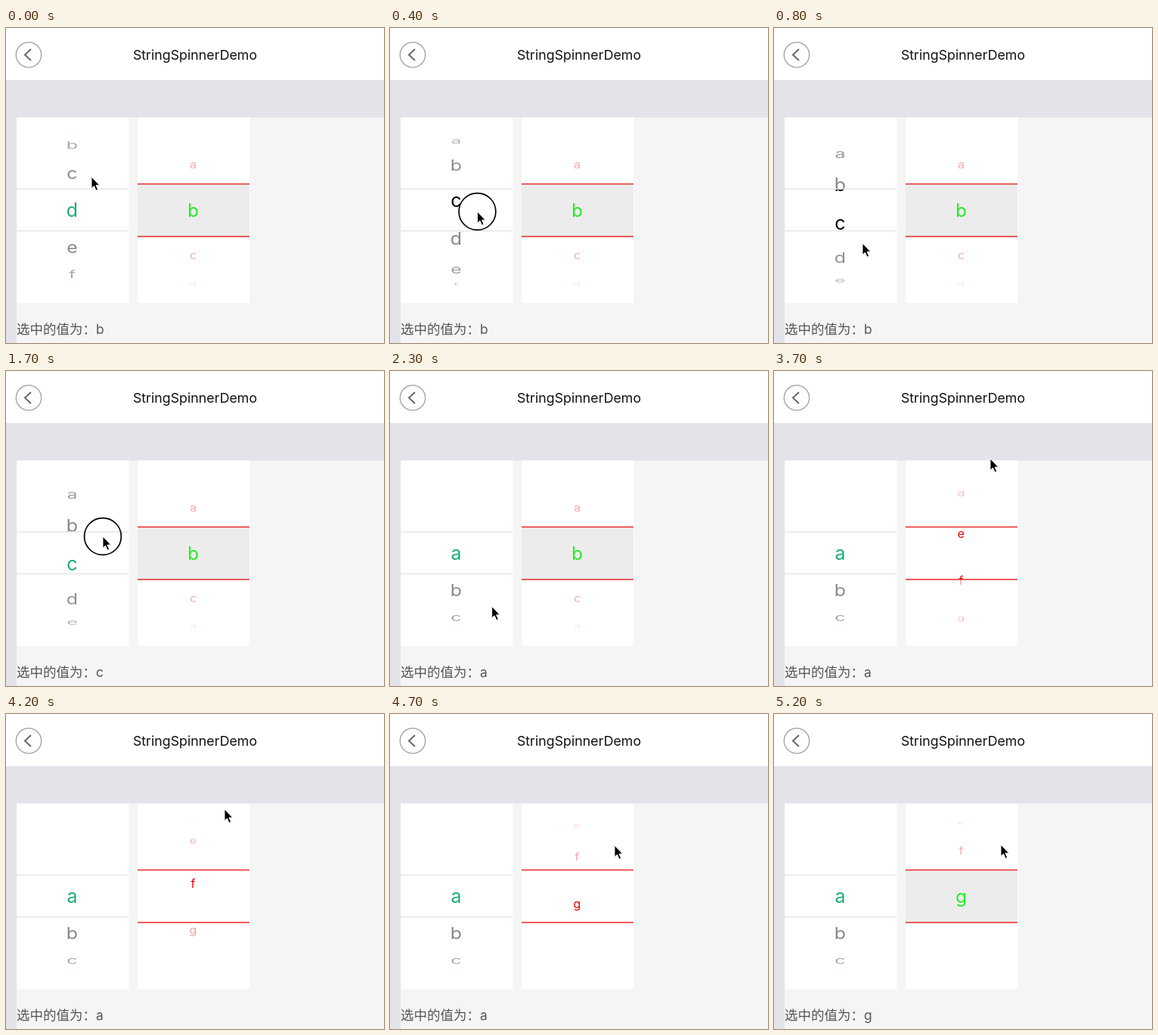
Animation of 500 by 417 pixels, one loop 5.6 s. Source, as an HTML page:

```html
<!DOCTYPE html>
<html lang="zh">
<head>
<meta charset="utf-8">
<title>StringSpinnerDemo</title>
<style>
html, body { margin: 0; width: 100%; height: 100%; overflow: hidden; background: #fff; }
svg { display: block; width: 500px; height: 417px; font-family: Inter, "Noto Sans CJK SC", "Noto Sans CJK", sans-serif; }
</style>
</head>
<body>
<svg id="stage" viewBox="0 0 500 417" xmlns="http://www.w3.org/2000/svg">
  <rect width="500" height="417" fill="#e4e3ea"/>
  <rect width="500" height="69" fill="#fff"/>
  <circle cx="30" cy="35.5" r="16.7" fill="none" stroke="#a0a0a0" stroke-width="1.3"/>
  <path d="M33 28 L25 35.5 L33 43" fill="none" stroke="#666" stroke-width="2"/>
  <text x="250" y="42" font-size="17.8" text-anchor="middle" fill="#111">StringSpinnerDemo</text>
  <rect x="14" y="118.5" width="486" height="298.5" fill="#f5f5f5"/>
  <rect x="14.5" y="118.5" width="148" height="245.5" fill="#fff"/>
  <rect x="174.5" y="118.5" width="148" height="245.5" fill="#fff"/>
  <g id="wheels"></g>
  <text x="14" y="405.3" font-size="17.5" fill="#555">选中的值为：</text>
  <text id="value" x="119" y="405.3" font-size="17.5" fill="#555"></text>
  <circle id="ring" r="24.4" fill="none" stroke="#000" stroke-width="1.7"/>
  <path id="arrow" d="M0 0 V15.4 L3.5 12.2 L6.1 18.2 L8.7 17.1 L6.1 11.2 H10.8 Z" fill="#000" stroke="#fff" stroke-width="1"/>
</svg>
<script>
const LOOP = 5600, MID = 241, LETTERS = [..."abcdefg"];
const $ = id => document.getElementById(id);

function add(parent, tag, attrs, text) {
  const node = document.createElementNS("http://www.w3.org/2000/svg", tag);
  set(node, attrs);
  if (text) node.textContent = text;
  parent.appendChild(node);
  return node;
}
function set(node, attrs) {
  for (const k in attrs) node.setAttribute(k, attrs[k]);
}

const lin = u => u;
const smooth = u => u * u * (3 - 2 * u);
const out = u => 1 - Math.pow(1 - u, 1.6);

// Each key is [time, [values], easing towards this key].
function track(keys, t) {
  let i = keys.findIndex(k => k[0] > t);
  if (i < 0) return keys[keys.length - 1][1];
  if (i === 0) return keys[0][1];
  const [t0, a] = keys[i - 1], [t1, b, ease = lin] = keys[i];
  const u = ease((t - t0) / (t1 - t0));
  return a.map((v, j) => v + (b[j] - v) * u);
}

const spinners = [
  {
    x: 87.5, left: 14.5, top: 213, bottom: 268.5, radius: 99.5, step: 29.5,
    size: 25, bigSize: 25, color: "#000", picked: "#1aad7d", fade: c => 0.5 * Math.pow(c, 0.6),
    line: "#e6e6e6", lineWidth: 1.5, back: "none",
    keys: [[200, [3]], [600, [1.5], smooth], [700, [1.5]], [800, [1.66]], [1100, [2], out],
           [1600, [2]], [1700, [1.73]], [2200, [0], out]],
    sel: t => t < 1100 ? 3 : t < 2300 ? 2 : 0
  },
  {
    x: 247.5, left: 174, top: 206.5, bottom: 276, radius: 102, step: 36,
    size: 16, bigSize: 24, color: "#e60000", picked: "#22ec22", fade: c => 0.42 * c,
    line: "#e82a2a", lineWidth: 1.5, back: "#ececec",
    keys: [[3100, [1]], [3500, [3.3], smooth], [3700, [4.41]], [5000, [6], out]],
    sel: t => t < 5000 ? 1 : 6
  }
];

const pointer = [
  [0, [113, 197]], [200, [114, 205]], [600, [117, 281], smooth], [800, [117, 285]],
  [1500, [127, 205], smooth], [1600, [127, 205]], [1700, [128, 219]], [2200, [133, 310], out],
  [2500, [138, 315]], [3000, [252, 268], smooth], [3100, [259, 265]],
  [3600, [284, 119], smooth], [3700, [286, 116]], [4200, [289, 126]],
  [4700, [297, 174], smooth], [4800, [300, 173]]
];
const presses = [[200, 600], [1600, 2100], [3100, 3500]];

spinners.forEach((s, n) => {
  const root = $("wheels"), h = s.bottom - s.top;
  const clip = add(root, "clipPath", { id: "band" + n });
  add(clip, "rect", { x: s.left, y: s.top, width: 148, height: h });
  const rest = add(root, "clipPath", { id: "rest" + n });
  add(rest, "rect", { x: s.left, y: 118, width: 148, height: s.top - 118 });
  add(rest, "rect", { x: s.left, y: s.bottom, width: 148, height: 364 - s.bottom });
  const outer = add(root, "g", { "clip-path": `url(#rest${n})` });
  const inner = add(root, "g", { "clip-path": `url(#band${n})` });
  s.back = add(inner, "rect", { x: s.left, width: 148, height: h, fill: s.back });
  const row = (g, l) => add(g, "text", { "text-anchor": "middle", fill: s.color, "font-size": s.size }, l);
  s.rows = LETTERS.map(l => [row(outer, l), row(inner, l)]);
  for (const y of [s.top, s.bottom])
    add(root, "rect", { x: s.left, y: y - s.lineWidth / 2, width: 148, height: s.lineWidth, fill: s.line });
});

function drawSpinner(s, t) {
  const [pos] = track(s.keys, t), sel = s.sel(t);
  s.rows.forEach(([far, near], i) => {
    const angle = (i - pos) * s.step * Math.PI / 180;
    const c = Math.cos(angle), shown = Math.abs(angle) < Math.PI / 2;
    const y = MID + s.radius * Math.sin(shown ? angle : Math.sign(angle) * Math.PI / 2);
    const place = `translate(${s.x} ${y}) scale(1 ${Math.max(c, 0.01)})`;
    const size = i === sel ? s.bigSize : s.size;
    set(far, { transform: place, y: s.size * 0.364, opacity: shown ? s.fade(c) : 0 });
    set(near, {
      transform: place, y: size * 0.364, "font-size": size, opacity: shown ? 1 : 0,
      fill: i === sel ? s.picked : s.color
    });
    if (i === sel) {
      const h = s.bottom - s.top;
      set(s.back, { y: y - h / 2, opacity: shown ? 1 : 0 });
    }
  });
}

function draw(time) {
  const t = Math.floor((time % LOOP) / 100) * 100;
  spinners.forEach(s => drawSpinner(s, t));
  $("value").textContent = t < 1100 ? "b" : t < 2300 ? "c" : t < 5000 ? "a" : "g";
  const at = `translate(${track(pointer, t).join(" ")})`;
  set($("arrow"), { transform: at });
  const down = presses.some(([a, b]) => t >= a && t <= b);
  set($("ring"), { transform: at, opacity: down ? 1 : 0 });
}

let start = null;
function tick(now) {
  if (start === null) start = now;
  draw(Math.max(0, now - start));
  requestAnimationFrame(tick);
}
draw(0);
requestAnimationFrame(tick);
</script>
</body>
</html>
```
